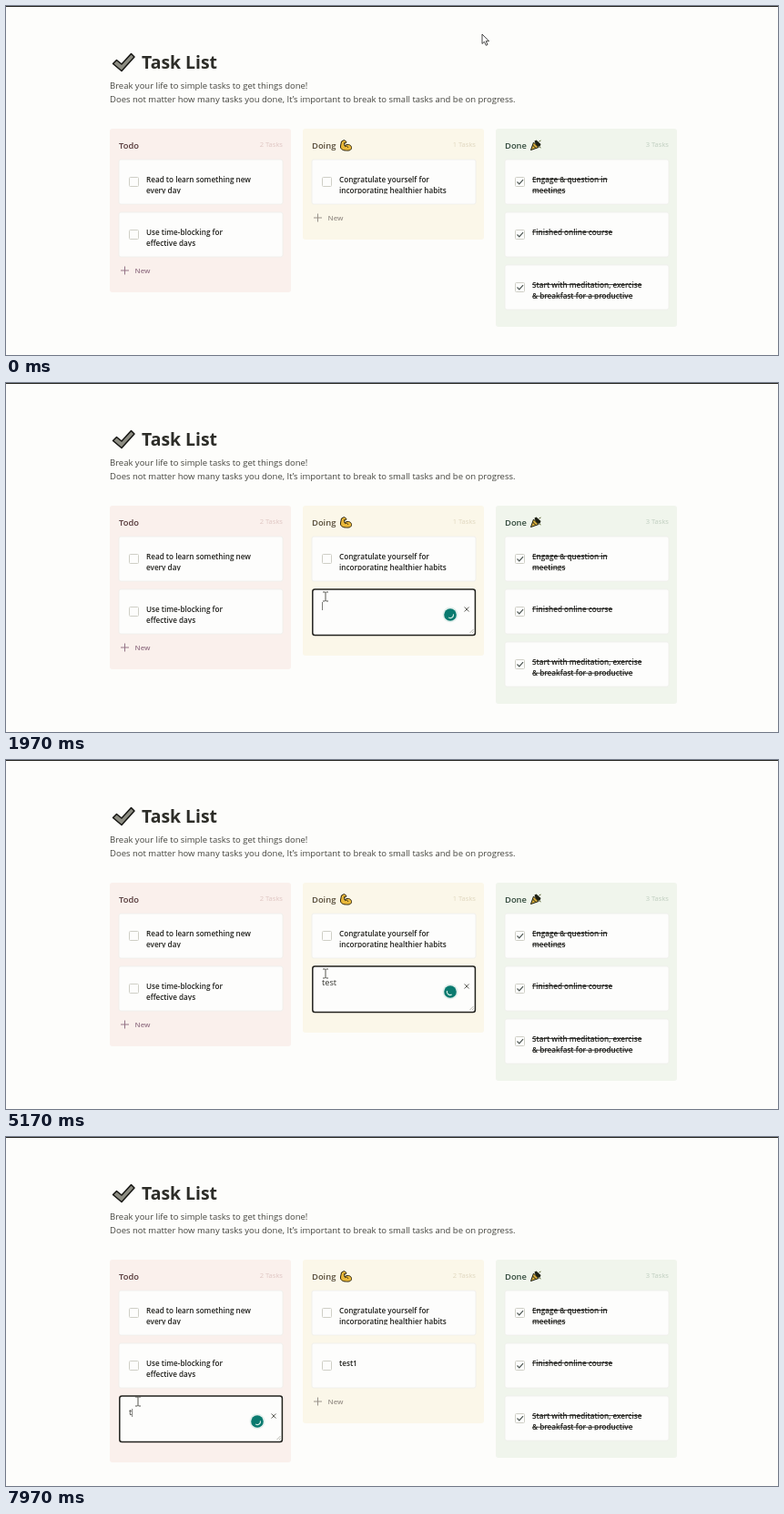
An HTML page for the animation above (8000 ms loop, 848 px wide and 384 px high).

```html
<!DOCTYPE html>
<html lang="en">
<head>
<meta charset="utf-8">
<title>Task List</title>
<style>
  html, body { margin: 0; width: 100%; height: 100%; overflow: hidden; background: #fdfdfb; }
  svg { display: block; width: 848px; height: 384px; font-family: "Open Sans", "Noto Sans", sans-serif; }
  text { white-space: pre; }
  .bold { font-weight: 600; }
  .done { text-decoration: line-through; }
</style>
</head>
<body>
<svg viewBox="0 0 848 384">
  <rect width="848" height="1" fill="#24241f"/>
  <path d="M117.5 63.5l4-4 5.5 4.5 10.500-11.500 3.500 3.500-14 15.500z" fill="#8c8c82" stroke="#151512" stroke-width="1.500" stroke-linejoin="round"/>
  <text x="149" y="69" font-size="19.400" font-weight="700" fill="#2d2d28">Task List</text>
  <g font-size="9.490" fill="#44443e">
    <text x="114" y="91">Break your life to simple tasks to get things done!</text>
    <text x="114" y="106.300">Does not matter how many tasks you done, It’s important to break to small tasks and be on progress.</text>
  </g>
  <g id="board"></g>
  <g id="pointer"></g>
</svg>
<script>
const LOOP = 8000;
const OPEN_DOING = 1500, COMMIT = 6470, OPEN_TODO = 7300;
const board = document.getElementById('board');
const pointer = document.getElementById('pointer');

const doingKeys = [[OPEN_DOING, ''], [2250, 't'], [2430, 'ts'], [2600, 'tst'], [3500, 'ts'],
  [3700, 't'], [3950, 'te'], [4200, 'tes'], [4450, 'test'], [5800, 'test1']];
const todoKeys = [[OPEN_TODO, ''], [7850, 't']];

const todo = [['Read to learn something new', 'every day'], ['Use time-blocking for', 'effective days']];
const doing = [['Congratulate yourself for', 'incorporating healthier habits']];
const done = [['Engage &amp; question in', 'meetings'], ['Finished online course'],
  ['Start with meditation, exercise', '&amp; breakfast for a productive']];

const muscle = `<path d="M368.500 149l3-1.500 2.500 2-1 1.500-1.500-.5.500 3.500c2-2.500 7-2 7.500 1.500.500 3-3 4-6 3.500-4 0-6.500-2-6-5z"
  fill="#e9b83a" stroke="#2c2410" stroke-linejoin="round"/><path d="M372 154.500q3-1.500 4 1.500" fill="none" stroke="#2c2410" stroke-width=".8"/>`;
const popper = `<path d="M580.500 148.500l2-1 5 4.500-1 2.500-4 .5z" fill="#1d2013"/>
  <path d="M576.500 158.500l3-8.500 5.500 5.500z" fill="#d5ab3c" stroke="#1d2013" stroke-linejoin="round"/>
  <path d="M578.500 153l3.500 3.500" stroke="#1d2013"/><path d="M585.500 149l2-1M586 155l1.500 1" stroke="#55602c"/>`;

const looks = {
  todo: { fill: '#faf0ec', head: '#55393a', count: '#dfc6c3', add: '#957487' },
  doing: { fill: '#fbf7e9', head: '#554a37', count: '#e0d7bf', add: '#99928a' },
  done: { fill: '#f0f5ec', head: '#30483a', count: '#c0cfc0' }
};

const ease = p => { p = Math.min(1, Math.max(0, p)); return p * p * (3 - 2 * p); };
const between = (t, a, b) => t >= a && t < b;

function card(x, y, lines, checked) {
  const id = `c${x}-${y}`;
  const rows = lines.map((s, i) =>
    `<text class="bold ${checked ? 'done' : ''}" x="${x + 30}" y="${y + 24.6 + i * 12.6}">${s}</text>`).join('');
  return `<rect x="${x}" y="${y}" width="180" height="49" rx="2" fill="#fdfdfc" stroke="#eeeeea" stroke-width=".8"/>
    <rect x="${x + 11.5}" y="${y + 19.5}" width="10" height="10" rx="1" fill="#fdfdfc" stroke="#cfcfc6"/>
    ${checked ? `<path d="M${x + 13.5} ${y + 24.5}l2.300 2.300 4.200-4.600" fill="none" stroke="#4c5552" stroke-width="1.200"/>` : ''}
    <clipPath id="${id}"><path d="M${x} ${y}h180v37.400h-180z"/></clipPath>
    <g clip-path="url(#${id})" font-size="8.170" fill="#1f1f1b">${rows}</g>`;
}

function editor(x, y, t, keys) {
  const [since, value] = keys.filter(k => k[0] <= t).pop();
  const caret = (t - since) % 1060 < 530 ? '<tspan dx="-2">|</tspan>' : '';
  const busy = t < 5400 || t > OPEN_TODO;
  return `<rect x="${x + .8}" y="${y}" width="178.600" height="50.500" rx="2.500" fill="#fdfdfc" stroke="#22221e" stroke-width="1.500"/>
    <text x="${x + 11}" y="${y + 21.3}" font-size="9.200" fill="#33332e">${value}${caret}</text>
    <path d="M${x + 167.5} ${y + 19.5}l5 5m0-5l-5 5" stroke="#55554e" stroke-width=".9"/>
    <path d="M${x + 173.5} ${y + 48}l4-4m-1.500 4l1.500-1.500" stroke="#99998f" stroke-width=".7"/>
    <circle cx="${x + 152}" cy="${y + 28}" r="8.500" fill="#e3efec"/>
    <circle cx="${x + 152}" cy="${y + 28}" r="6.800" fill="#0a7a6f"/>
    ${busy ? `<path transform="translate(${x + 152} ${y + 28}) rotate(${t * .36 % 360})" d="M3.500 0A3.500 3.500 0 0 1-2.500 2.500"
      fill="none" stroke="#dff3ec" stroke-width="1.100"/>` : ''}`;
}

// An open column ends with a "New" row, or with an editor while keys are given.
function column(x, name, icon, cards, look, t, keys) {
  const left = x + 10, end = 169 + cards.length * 58;
  const bottom = keys ? end + 73 : look.add ? end + 30 : end + 10;
  const newRow = `<path d="M${left + 2} ${end + 6}h9m-4.500-4.500v9" stroke="${look.add}"/>
    <text class="bold" x="${left + 17.5}" y="${end + 9.3}" font-size="7.900" fill="${look.add}">New</text>`;
  return `<rect x="${x}" y="135" width="199" height="${bottom - 135}" rx="3" fill="${look.fill}"/>
    <text class="bold" x="${left}" y="157" font-size="9.400" fill="${look.head}">${name}</text>${icon}
    <text x="${x + 190}" y="155.300" text-anchor="end" font-size="7.600" fill="${look.count}">${cards.length} Tasks</text>
    ${cards.map((c, i) => card(left, 169 + i * 58, c, !look.add)).join('')}
    ${keys ? editor(left, end, t, keys) : look.add ? newRow : ''}`;
}

function drawBoard(t) {
  const doingCards = t >= COMMIT ? [...doing, ['test1']] : doing;
  board.innerHTML =
    column(114, 'Todo', '', todo, looks.todo, t, t >= OPEN_TODO && todoKeys) +
    column(326, 'Doing', muscle, doingCards, looks.doing, t, between(t, OPEN_DOING, COMMIT) && doingKeys) +
    column(538, 'Done', popper, done, looks.done, t);
}

const shapes = {
  arrow: '<path d="M0 0v10.500l2.400-2.200 1.900 4 1.700-.8-1.800-3.800h3.300z" fill="#fff" stroke="#333" stroke-width=".9"/>',
  hand: `<path d="M-1 1.500q1-1.800 2 0v4l5 1.200q1.500.5 1.200 2.200l-.8 3.600-1 2.500h-6l-3.400-5q-1-2 .6-1.800l2.400 1.800z"
    fill="#fff" stroke="#222" stroke-width=".9" stroke-linejoin="round"/><path d="M2.700 6.500v2m2-1.500v2" stroke="#222" stroke-width=".6"/>`,
  beam: '<path d="M-3-5h2.300l.7.7.7-.7H3M0-4.300v8.600M-3 5h2.300l.7-.7.7.7H3" fill="none" stroke="#44443e" stroke-width=".9"/>'
};

function drawPointer(t) {
  const a = ease((t - 100) / 970), b = ease((t - 6550) / 500);
  const x = 523 - 172 * a - 206 * b, y = 31 + 204 * a + 56 * b;
  const overNew = between(t, 1020, OPEN_DOING) || between(t, 6980, OPEN_TODO);
  const typing = between(t, OPEN_DOING, COMMIT) || t >= OPEN_TODO;
  const click = between(t, 1180, 1400) || between(t, 7130, 7280);
  pointer.innerHTML = `<g transform="translate(${x} ${y})">
    ${shapes[typing ? 'beam' : overNew ? 'hand' : 'arrow']}
    ${click ? '<circle cx="-1.500" cy="-.5" r="2.200" fill="#d8331d"/>' : ''}</g>`;
}

function frame(now) {
  const t = now % LOOP;
  drawBoard(t);
  drawPointer(t);
  requestAnimationFrame(frame);
}
frame(0);
</script>
</body>
</html>
```
